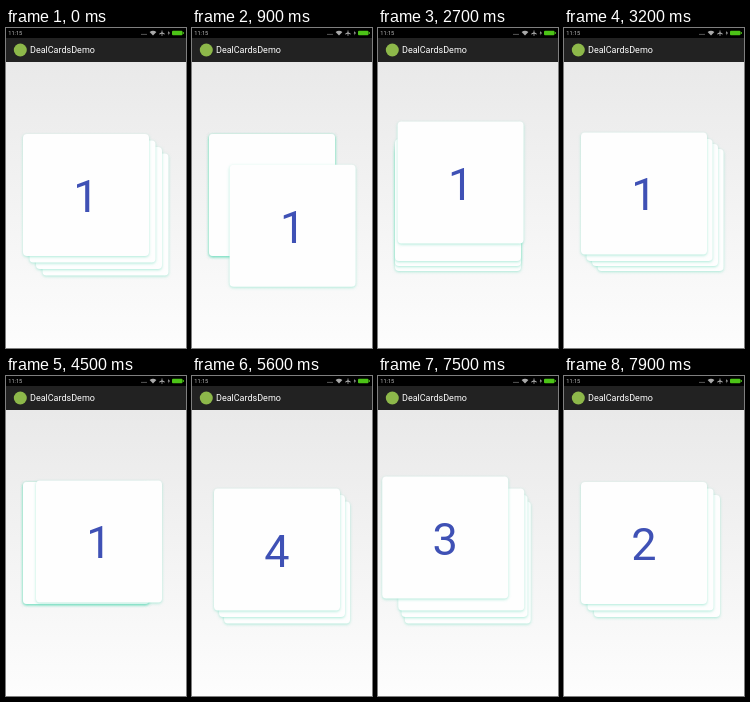
An HTML page that plays this animation: 180 px wide and 320 px high, repeating every 8000 ms.

```html
<!DOCTYPE html>
<html lang="en">
<head>
<meta charset="utf-8">
<title>DealCardsDemo</title>
<style>
  html, body { margin: 0; width: 100%; height: 100%; overflow: hidden; }
  body { position: relative; font-family: Roboto, sans-serif; background: #fdfdfd; }
  #stage {
    position: absolute; left: 0; top: 0; width: 180px; height: 320px; overflow: hidden;
    background: linear-gradient(#e9e9e9 34px, #fdfdfd 320px);
  }
  #bars { position: absolute; left: 0; top: 0; z-index: 9; }
  .card {
    position: absolute; left: 0; top: 0; width: 126px; height: 122px;
    border-radius: 4px; background: #fefefe;
    box-shadow: 0 1px 3px rgba(110, 220, 190, .55);
    color: #3f51b5; font-size: 45px; line-height: 125px; text-align: center;
  }
</style>
</head>
<body>
<div id="stage">
  <svg id="bars" width="180" height="34" font-family="Roboto, sans-serif">
    <rect width="180" height="34" fill="#222"/>
    <rect width="180" height="10" fill="#000"/>
    <text x="2.3" y="7.3" font-size="5.6" fill="#bbb">11:15</text>
    <g fill="#aaa">
      <circle cx="136" cy="6.3" r=".6"/>
      <circle cx="138" cy="6.3" r=".6"/>
      <circle cx="140" cy="6.3" r=".6"/>
      <path d="M143.6 3.9Q147 1.5 150.4 3.9L147 7.6Z"/>
      <path d="M155.6 2.4v1.8l-2.4 1.5v.7l2.4-.6v1.1l-.6.6h2l-.6-.6V5.8l2.4.6v-.7l-2.4-1.5V2.4z"/>
      <path d="M163 2.8l-1.3 2.6h1l-.3 2 1.6-2.8h-1z"/>
    </g>
    <rect x="166" y="2.8" width="10.5" height="4.4" rx="1" fill="#4cc417"/>
    <rect x="176.8" y="4" width="1" height="2" fill="#4cc417"/>
    <circle cx="14.3" cy="22" r="6.5" fill="#8db84a"/>
    <text x="24" y="25.4" font-size="9" fill="#fff">DealCardsDemo</text>
  </svg>
</div>
<script>
const LOOP = 8000, STEP = 100, HOME = { x: 17, y: 106 }, GAP = 6.5;
const deck = [1, 4, 3, 2];

// dx, dy: reach of a drag, or distance flung in 300 ms after the hold
const gestures = [
  { start: 400, end: 1200, dx: 35, dy: 52 },
  { start: 1600, end: 2400, dx: 35, dy: 48 },
  { start: 2500, end: 3200, dx: 5, dy: -40 },
  { start: 4000, end: 5800, dx: -110, dy: 0, deal: true, hold: 600 },
  { start: 6000, end: 6800, dx: 132, dy: -3, deal: true, hold: 0 },
  { start: 7400, end: 8000, dx: -115, dy: -49, deal: true, hold: 0 }
];

const ramp = (t, from, to) => Math.min(1, Math.max(0, (t - from) / (to - from)));

// Pulled out along a curve, then springs home past its place
function drag({ start, end, dx, dy }, t) {
  const peak = start + (end - start) * .55;
  if (t < peak) {
    const p = ramp(t, start, peak);
    return [dx * p, dy * p * p];
  }
  const u = ramp(t, peak, end), k = Math.cos(1.5 * Math.PI * u) * (1 - u);
  return [dx * k, dy * k];
}

// Carried slowly to the right while held, then thrown off
function fling({ start, hold, dx, dy }, t) {
  const age = t - start, q = Math.max(0, age - hold) / 300;
  return [Math.min(age, hold) * .026 + dx * q * q, dy * q * q];
}

// 0 is fanned out, 1 is one column, 2 is fully squared up
function squeeze({ start, end, deal }, t) {
  const opening = deal ? (end - 120 - t) / 350 : (end - t) / 150;
  return Math.max(0, Math.min(2, (t - start) / 200, opening));
}

const stage = document.getElementById('stage');
const cards = deck.map(n => {
  const el = document.createElement('div');
  el.className = 'card';
  el.textContent = n;
  return stage.appendChild(el);
});

function draw(t) {
  const dealt = gestures.filter(g => g.deal && t >= g.end).length;
  const g = gestures.find(g => t >= g.start && t < g.end);
  const [dx, dy] = g ? (g.deal ? fling : drag)(g, t) : [0, 0];
  const c = g ? squeeze(g, t) : 0;
  const shift = g && g.deal ? ramp(t, g.end - 200, g.end - 100) : 0;

  // The second drag leaves the stack a little tight and the top card high
  const tight = ramp(t, 2200, 2400) * (1 - ramp(t, 3700, 3900));
  const lift = dealt ? 0 : 1.6 * ramp(t, 2200, 2400);
  const gapX = GAP * (1 - Math.min(c, 1)) * (1 - .15 * tight);
  const gapY = GAP * (1 - Math.max(c - 1, 0)) * (1 - .23 * tight);

  cards.forEach((el, n) => {
    const place = (n - dealt + cards.length) % cards.length;
    const x = HOME.x + (place ? (place - shift) * gapX : dx);
    const y = HOME.y + (place ? (place - shift) * gapY : dy - lift);
    el.style.zIndex = cards.length - place;
    el.style.transform = `translate(${x}px, ${y}px)`;
  });
}

const start = performance.now();
function tick() {
  const t = (performance.now() - start) % LOOP;
  draw(Math.floor(t / STEP) * STEP);
  requestAnimationFrame(tick);
}
tick();
</script>
</body>
</html>
```
